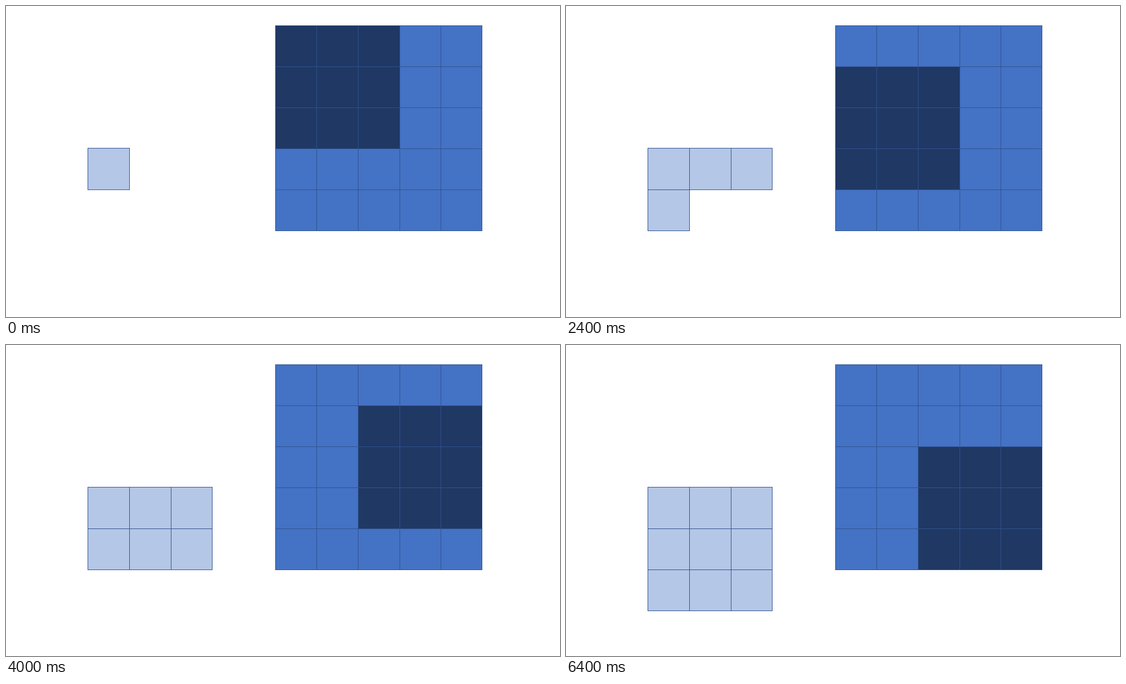
An HTML page with a canvas for the animation above (7200 ms loop, 998 px wide and 561 px high).

```html
<!DOCTYPE html>
<html lang="en">
<head>
<meta charset="utf-8">
<title>Sliding window over a grid</title>
<style>
  html, body { margin: 0; width: 100%; height: 100%; overflow: hidden; background: #fff; }
  canvas { display: block; }
</style>
</head>
<body>
<canvas id="stage" width="998" height="561"></canvas>
<script>
const ctx = document.getElementById('stage').getContext('2d');
const STEP = 800, SIZE = 3, STEPS = SIZE * SIZE;
const LINE = '#2f528f', BASE = '#4472c4', DARK = '#203864', LIGHT = '#b4c7e7';

// Pixel positions of the grid lines
const input = { xs: [485, 559, 634, 709, 783, 857], ys: [35, 109, 183, 257, 331, 405] };
const output = { xs: [147, 222, 297, 371], ys: [256, 331, 405, 479] };

function cell(grid, col, row, fill) {
  const x = grid.xs[col], y = grid.ys[row];
  const w = grid.xs[col + 1] - x, h = grid.ys[row + 1] - y;
  ctx.fillStyle = fill;
  ctx.fillRect(x, y, w, h);
  ctx.strokeStyle = LINE;
  ctx.lineWidth = 1;
  ctx.strokeRect(x + 0.5, y + 0.5, w, h);
}

function draw(step) {
  ctx.fillStyle = '#fff';
  ctx.fillRect(0, 0, 998, 561);

  const left = step % SIZE, top = Math.floor(step / SIZE);
  for (let row = 0; row < 5; row++) {
    for (let col = 0; col < 5; col++) {
      const inside = col >= left && col < left + SIZE && row >= top && row < top + SIZE;
      cell(input, col, row, inside ? DARK : BASE);
    }
  }
  for (let i = 0; i <= step; i++) {
    cell(output, i % SIZE, Math.floor(i / SIZE), LIGHT);
  }
}

const start = performance.now();
function tick() {
  const time = performance.now() - start;
  draw(Math.floor(time / STEP) % STEPS);
  requestAnimationFrame(tick);
}
tick();
</script>
</body>
</html>
```
